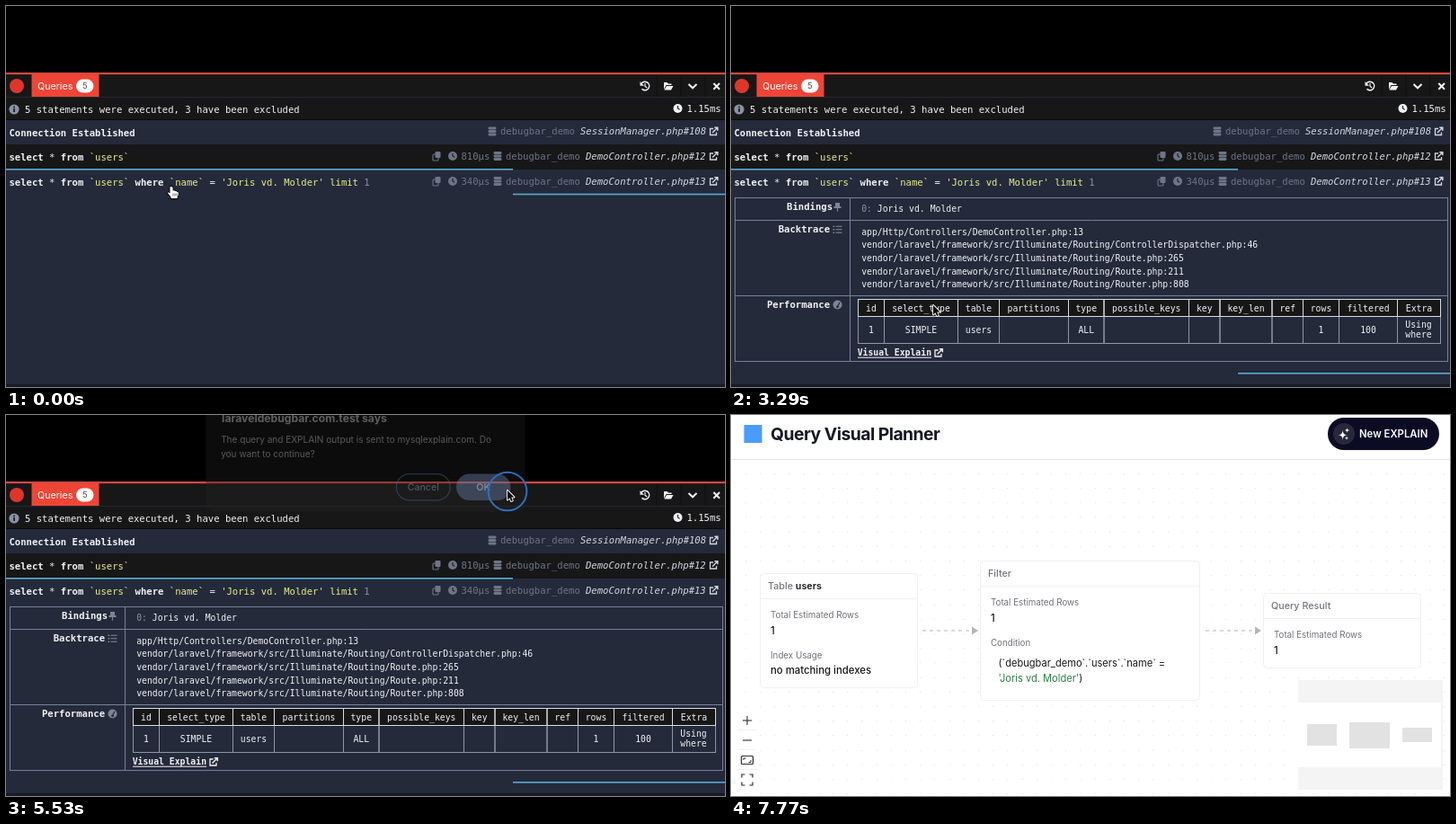
Write an HTML page with a canvas that moves like this. It is 800 by 424 pixels and loops after 7.84 s.

```html
<!DOCTYPE html>
<html lang="en">
<head>
<meta charset="utf-8">
<title>Query explain demo</title>
<style>
  html, body { margin: 0; width: 100%; height: 100%; overflow: hidden; background: #000; }
  canvas { display: block; width: 800px; height: 424px; }
</style>
</head>
<body>
<canvas id="stage" width="800" height="424"></canvas>
<script>
const ctx = document.getElementById('stage').getContext('2d');
const LOOP = 7840;
const MONO = '"DejaVu Sans Mono", monospace';
const SANS = 'Inter, sans-serif';
const NAVY = '#242a3a', DARK = '#171718', WHITE = '#f1f2f4', GREY = '#6d7588', YELLOW = '#e8ee86', BLUE = '#5aa9cf';
const PERSON = 'Joris vd. Molder';
const EXPAND = 280, EXPLAIN = 2240, DIALOG = 4270, CONFIRM = 5460, PAGE = 5740, GRAPH = 6160;
const CLICKS = [[210, 184, 202], [2030, 226, 334], [4200, 210, 387], [5390, 558, 85]];
const CURSOR = [
  [0, 184, 201], [450, 184, 201], [1260, 225, 333], [3290, 225, 333], [3990, 209, 386],
  [4480, 209, 386], [5180, 558, 84], [5600, 558, 84], [5740, 556.5, 87], [6200, 556.5, 87], [6850, 520, 440]
];

const clamp = v => Math.max(0, Math.min(1, v));
const ease = v => v * v * (3 - 2 * v);

function rect(x, y, w, h, color) {
  ctx.fillStyle = color;
  ctx.fillRect(x, y, w, h);
}

function round(x, y, w, h, r, fill, stroke, width = 1) {
  ctx.beginPath();
  ctx.roundRect(x, y, w, h, r);
  if (fill) { ctx.fillStyle = fill; ctx.fill(); }
  if (stroke) { ctx.strokeStyle = stroke; ctx.lineWidth = width; ctx.stroke(); }
}

function disc(x, y, r, color) {
  ctx.fillStyle = color;
  ctx.beginPath();
  ctx.arc(x, y, r, 0, Math.PI * 2);
  ctx.fill();
}

function line(points, color, width = 1, close = false) {
  ctx.beginPath();
  points.forEach(([x, y]) => ctx.lineTo(x, y));
  if (close) ctx.closePath();
  ctx.strokeStyle = color;
  ctx.lineWidth = width;
  ctx.stroke();
}

function shape(points, color) {
  ctx.beginPath();
  points.forEach(([x, y]) => ctx.lineTo(x, y));
  ctx.fillStyle = color;
  ctx.fill();
}

// Draws text centred vertically on y and returns its right edge.
function text(str, x, y, size, color, { family = MONO, style = '', align = 'left', spacing = 0 } = {}) {
  ctx.font = `${style} ${size}px ${family}`;
  ctx.letterSpacing = spacing + 'px';
  ctx.textAlign = align;
  ctx.fillStyle = color;
  ctx.fillText(str, x, y + size * 0.35);
  const end = x + ctx.measureText(str).width;
  ctx.letterSpacing = '0px';
  return end;
}

const sans = (str, x, y, size, color, style = '', align = 'left') =>
  text(str, x, y, size, color, { family: SANS, style, align });

function runs(parts, x, y, size) {
  for (const [str, color, style] of parts) x = text(str, x, y, size, color, { style });
}

const clockIcon = (x, y, color, back) => {
  disc(x, y, 5, color);
  line([[x, y - 3], [x, y], [x + 2.2, y + 1.4]], back, 1.1);
};

const databaseIcon = (x, y) => {
  for (let i = 0; i < 3; i++) round(x - 4.5, y - 5 + i * 3.5, 9, 2.9, 1.3, GREY);
};

const copyIcon = (x, y) => {
  round(x - 4, y - 2, 6, 7, 1, null, GREY, 1.1);
  round(x - 1.5, y - 5, 6, 7, 1, GREY);
};

const linkIcon = (x, y, color = '#d5d8df') => {
  line([[x - 0.5, y - 3], [x - 4, y - 3], [x - 4, y + 4], [x + 3, y + 4], [x + 3, y + 1]], color, 1.3);
  line([[x - 1.5, y + 1.5], [x + 4, y - 4]], color, 1.4);
  line([[x + 0.8, y - 4.3], [x + 4.3, y - 4.3], [x + 4.3, y - 0.8]], color, 1.5);
};

function toolbar() {
  rect(0, 74, 800, 2.5, '#d14a40');
  rect(0, 76.5, 800, 50, DARK);
  rect(0, 101, 800, 1, '#26272b');
  disc(12, 89, 8, '#e0352b');
  rect(28.5, 76, 75, 25, '#ee4536');
  sans('Queries', 35, 89, 10.7, '#fff');
  round(78, 81.5, 19.5, 15, 7.5, '#fff');
  sans('5', 87.8, 89, 9.5, '#555', '', 'center');
  [723.5, 750.5, 777.5].forEach(x => rect(x, 77, 1, 24, '#111'));
  ctx.beginPath();
  ctx.arc(711, 89, 4.7, -2.7, 2.4);
  ctx.strokeStyle = WHITE;
  ctx.lineWidth = 1.5;
  ctx.stroke();
  shape([[705.5, 84], [705.5, 88.8], [710, 88.8]], WHITE);
  line([[711, 86], [711, 89.3], [713.2, 91]], WHITE, 1.2);
  shape([[732, 93], [732, 85], [735.5, 85], [737, 86.5], [740.5, 86.5], [740.5, 88], [734.5, 88]], WHITE);
  shape([[735, 89], [742.5, 89], [740, 93.5], [732.5, 93.5]], WHITE);
  line([[759.5, 87], [764, 91.3], [768.5, 87]], WHITE, 2);
  line([[787.3, 86], [794, 92.7]], WHITE, 2);
  line([[794, 86], [787.3, 92.7]], WHITE, 2);

  disc(9, 115, 5.6, '#8992a5');
  rect(8.2, 114, 1.7, 4, DARK);
  rect(8.2, 111.6, 1.7, 1.6, DARK);
  text('5 statements were executed, 3 have been excluded', 21, 115, 10.58, WHITE);
  clockIcon(747.5, 114, WHITE, DARK);
  text('1.15ms', 757.5, 114.5, 10.58, WHITE);
}

function rowInfo(y, file, fileX, time) {
  const dbX = time ? 547 : 541;
  if (time) {
    copyIcon(479, y);
    clockIcon(497, y, GREY, DARK);
    text(time, 506.5, y, 10.58, GREY);
  }
  databaseIcon(dbX, y);
  text('debugbar_demo', dbX + 9, y, 10.58, GREY);
  text(file, fileX, y, 10.58, '#d5d8df', { style: 'italic' });
  linkIcon(787.5, y);
}

function statements(t) {
  rect(0, 127, 800, 297, NAVY);
  rect(0, 154, 800, 28, DARK);
  rect(0, 421, 800, 3, '#171b27');
  text('Connection Established', 3.5, 141, 10.58, WHITE, { style: 'bold' });
  rowInfo(139.5, 'SessionManager.php#108', 639, '');
  const select = [['select', WHITE, 'bold'], [' * ', WHITE], ['from', WHITE, 'bold'], [' `users`', YELLOW]];
  runs(select, 3.5, 168.5, 10.58);
  rowInfo(167, 'DemoController.php#12', 645, '810µs');
  rect(0, 181, 564, 1.6, BLUE);
  runs([...select, [' where ', WHITE, 'bold'], ['`name`', YELLOW], [' = ', WHITE],
    [`'${PERSON}' limit `, YELLOW], ['1', '#8c91ad']], 3.5, 196.5, 10.58);
  rowInfo(195, 'DemoController.php#13', 645, '340µs');
  rect(564, t < EXPAND ? 208.7 : t < EXPLAIN ? 358.7 : 408, 236, 1.6, BLUE);
}

function details(explained) {
  const border = '#76819a';
  const split = explained ? 132.5 : 144.5;
  const bottom = explained ? 395.5 : 346.5;
  ctx.strokeStyle = border;
  ctx.lineWidth = 1;
  ctx.strokeRect(4.5, 213.5, 793, bottom - 213.5);
  [238.5, 322.5].forEach(y => line([[4, y], [797, y]], border));
  line([[split, 213], [split, bottom]], border);

  const label = (str, right, y) => text(str, split - right, y, 10.58, WHITE, { style: 'bold', align: 'right' });
  label('Bindings', 19.5, 223.5);
  label('Backtrace', 22.5, 248.5);
  label('Performance', 22.5, 332.5);
  const iconX = split - 14;
  rect(iconX - 2.5, 219, 5, 4, '#7d8494');
  rect(iconX - 4, 223, 8, 2, '#7d8494');
  rect(iconX - 0.6, 225, 1.2, 3.6, '#7d8494');
  for (let i = 0; i < 3; i++) {
    rect(iconX - 5, 244.5 + i * 3.5, 1.6, 1.6, '#7d8494');
    rect(iconX - 2, 244.7 + i * 3.5, 7, 1.1, '#7d8494');
  }
  disc(iconX, 332.5, 5, '#7d8494');
  line([[iconX, 334.5], [iconX + 2.5, 329.8]], NAVY, 1.2);
  disc(iconX, 334.8, 1.4, NAVY);

  const x = split + 12.7;
  runs([['0: ', '#8c91a0'], [PERSON, WHITE]], x, 226, 9.77);
  const routing = 'vendor/laravel/framework/src/Illuminate/Routing/';
  ['app/Http/Controllers/DemoController.php:13', routing + 'ControllerDispatcher.php:46',
    routing + 'Route.php:265', routing + 'Route.php:211', routing + 'Router.php:808'
  ].forEach((str, i) => text(str, x, 251.3 + i * 14.65, 9.77, WHITE));

  if (explained) return explainTable();
  round(153, 325.5, 83, 17.5, 3, '#303238');
  text('Run EXPLAIN', 158.7, 334.3, 10.58, WHITE);
}

function explainTable() {
  const columns = [['id', 29, '1'], ['select_type', 82, 'SIMPLE'], ['table', 46, 'users'], ['partitions', 77, ''],
    ['type', 39.5, 'ALL'], ['possible_keys', 94.5, ''], ['key', 34.5, ''], ['key_len', 58, ''], ['ref', 34.5, ''],
    ['rows', 40, '1'], ['filtered', 65, '100'], ['Extra', 48, '']];
  const cell = (str, x, y) => text(str, x, y, 9.77, WHITE, { align: 'center' });
  rect(141, 326, 648, 19, DARK);
  let x = 141.5;
  for (const [head, width, value] of columns) {
    ctx.lineWidth = 1;
    ctx.strokeStyle = '#8d96a8';
    ctx.strokeRect(x, 345.5, width, 30);
    ctx.strokeStyle = '#d9dce2';
    ctx.strokeRect(x, 326.5, width, 19);
    cell(head, x + width / 2, 336.3);
    cell(value, x + width / 2, 360.5);
    x += width;
  }
  cell('Using', 765, 355);
  cell('where', 765, 366);
  text('Visual Explain', 140.7, 386, 9.77, WHITE, { style: 'bold' });
  rect(141, 390.7, 82, 1, WHITE);
  linkIcon(231, 386, WHITE);
}

function dialog(t) {
  const a = t < 5000 ? clamp((t - DIALOG + 14) / 140) : 1 - clamp((t - CONFIRM + 18) / 140);
  if (!a) return;
  const scale = 0.97 + 0.03 * a;
  ctx.save();
  ctx.globalAlpha = a;
  ctx.translate(400 * (1 - scale), -8 * (1 - a));
  ctx.scale(scale, scale);
  round(219, -40, 362, 155, 8, '#222223');
  sans('laraveldebugbar.com.test says', 237, 9.3, 12.4, '#eee', 'bold');
  sans('The query and EXPLAIN output is sent to mysqlexplain.com. Do', 236, 33.6, 10.25, '#e2e2e2');
  sans('you want to continue?', 236, 49.8, 10.25, '#e2e2e2');
  round(435, 72, 61, 30, 15, null, '#5479a8', 1.3);
  sans('Cancel', 465.5, 87, 10.8, '#a9c2ec', '500', 'center');
  round(503, 72, 61.5, 30, 15, '#7891c2');
  sans('OK', 533.7, 87, 10.8, '#fff', '600', 'center');
  ctx.restore();
}

function header() {
  rect(0, 0, 800, 424, '#fff');
  rect(0, 49, 800, 1, '#e6e6e8');
  rect(14.5, 11, 20, 20, '#4b9bfa');
  text('Query Visual Planner', 44, 21, 19.3, '#151823', { family: SANS, style: 'bold', spacing: -0.5 });
  round(664, 3, 124, 36, 18, '#0b0b24');
  disc(682, 21, 12, '#28283c');
  const spark = (x, y, r) => {
    ctx.beginPath();
    ctx.moveTo(x, y - r);
    for (const [dx, dy] of [[r, 0], [0, r], [-r, 0], [0, -r]]) ctx.quadraticCurveTo(x, y, x + dx, y + dy);
    ctx.fillStyle = '#fff';
    ctx.fill();
  };
  spark(680.6, 22.3, 5.5);
  spark(685.5, 17, 3);
  spark(685, 25.8, 2.2);
  sans('New EXPLAIN', 699, 21, 11.35, '#fff', '600');
}

function card(x, y, w, h, title, strong = '') {
  round(x + 0.5, y + 0.5, w, h, 4, '#fff', '#f0f0f2');
  line([[x, y + 28.5], [x + w, y + 28.5]], '#f1f1f3');
  const end = sans(title, x + 9, y + 14.5, 10.75, '#74747c', '500');
  if (strong) sans(strong, end, y + 14.5, 10.75, '#18181b', '600');
}

function field(label, value, x, y) {
  sans(label, x, y, 9.75, '#707078');
  sans(value, x, y + 16.8, 11.35, '#18181b', '500');
}

function edge(x, t) {
  ctx.save();
  ctx.setLineDash([4, 4]);
  ctx.lineDashOffset = -(t + 230) / 500 * 8;
  line([[x, 240], [x + 56, 240]], '#b4b4b8', 1.1);
  ctx.restore();
  shape([[x + 55, 235.5], [x + 62, 240], [x + 55, 244.5]], '#b4b4b8');
}

function graph(t) {
  const gap = 16.2;
  for (let y = 64.8; y < 424; y += gap)
    for (let x = 15.8; x < 800; x += gap) rect(Math.round(x), Math.round(y), 1, 1, '#dfdfe3');

  edge(213, t);
  edge(528, t);
  card(32, 176, 175, 127, 'Table ', 'users');
  field('Total Estimated Rows', '1', 44, 223);
  field('Index Usage', 'no matching indexes', 44, 267.3);
  card(277, 162, 244, 155, 'Filter');
  field('Total Estimated Rows', '1', 289, 209);
  sans('Condition', 289, 253.5, 9.75, '#707078');
  sans('(`debugbar_demo`.`users`.`name` =', 297.5, 276, 11.1, '#18181b');
  const end = sans(`'${PERSON}'`, 297.5, 293, 11.1, '#2f8045');
  sans(')', end, 293, 11.1, '#18181b');
  card(592, 198, 175, 83, 'Query Result');
  field('Total Estimated Rows', '1', 604, 245);

  rect(631, 295, 161, 122, '#f4f4f4');
  rect(631, 320, 159, 72, '#fff');
  [[641, 344, 33, 24], [688, 342, 45, 29], [747, 348, 33, 16]].forEach(box => rect(...box, '#e2e2e2'));

  rect(7, 329, 22, 89, '#fff');
  [350.5, 372.5, 394.5].forEach(y => line([[7, y], [29, y]], '#f0f0f2'));
  const ink = '#2c2c2e';
  line([[13, 340], [23, 340]], ink, 1.1);
  line([[18, 335], [18, 345]], ink, 1.1);
  line([[13, 362], [23, 362]], ink, 1.1);
  round(11.5, 379.5, 13, 9, 1, null, ink, 1.2);
  line([[14, 384], [14, 382], [16.5, 382]], ink);
  line([[22, 384], [22, 386.5], [19.5, 386.5]], ink);
  for (const sx of [-1, 1]) for (const sy of [-1, 1])
    line([[18 + sx * 6, 406 + sy * 2.5], [18 + sx * 6, 406 + sy * 6], [18 + sx * 2.5, 406 + sy * 6]], ink, 1.2);
}

function ring(t) {
  for (const [start, x, y] of CLICKS) {
    const age = t - start;
    if (age < 0 || age > 420 || t >= PAGE) continue;
    ctx.save();
    ctx.globalAlpha = 1 - clamp((age - 240) / 180);
    ctx.beginPath();
    ctx.arc(x, y, 8 + 13.5 * ease(clamp(age / 150)), 0, Math.PI * 2);
    ctx.strokeStyle = '#2f6fc0';
    ctx.lineWidth = 2;
    ctx.stroke();
    ctx.restore();
  }
}

function cursorAt(t) {
  for (let i = 1; i < CURSOR.length; i++) {
    const [t0, x0, y0] = CURSOR[i - 1], [t1, x1, y1] = CURSOR[i];
    if (t < t1) {
      const k = ease((t - t0) / (t1 - t0));
      return [x0 + (x1 - x0) * k, y0 + (y1 - y0) * k];
    }
  }
  return CURSOR[CURSOR.length - 1].slice(1);
}

function cursor(t) {
  const hand = t < EXPLAIN || (t > 3800 && t < DIALOG);
  const points = hand
    ? [[-0.8, 0], [0.8, 0], [1.5, 1], [1.6, 4.3], [3.4, 4.4], [4.2, 5.1], [5.8, 5.2], [6.4, 6], [7.7, 6.3],
      [7.8, 9], [6.6, 11.6], [6.5, 13], [0, 13], [-1.2, 10.6], [-4, 7.3], [-3.6, 6.3], [-1.5, 7.4], [-1.5, 1]]
    : [[0, 0], [0, 10.5], [2.4, 8.3], [4.1, 12], [5.8, 11.3], [4.2, 7.6], [7.5, 7.5]];
  ctx.save();
  ctx.translate(...cursorAt(t));
  ctx.lineJoin = 'round';
  ctx.shadowColor = 'rgba(0,0,0,.3)';
  ctx.shadowBlur = 2;
  ctx.shadowOffsetY = 1;
  line(points, hand ? '#111' : '#fff', 1.8, true);
  ctx.shadowColor = 'transparent';
  shape(points, hand ? '#fff' : '#050505');
  if (hand) [2, 4, 6].forEach(x => line([[x, 7.5], [x, 10.5]], '#333', 0.7));
  ctx.restore();
}

function draw(t) {
  if (t < PAGE) {
    rect(0, 0, 800, 424, '#000');
    statements(t);
    toolbar();
    if (t >= EXPAND) details(t >= EXPLAIN);
    dialog(t);
  } else {
    header();
    if (t >= GRAPH) graph(t);
  }
  ring(t);
  cursor(t);
}

const start = performance.now();
function tick() {
  draw((performance.now() - start) % LOOP);
  requestAnimationFrame(tick);
}
tick();
</script>
</body>
</html>
```
